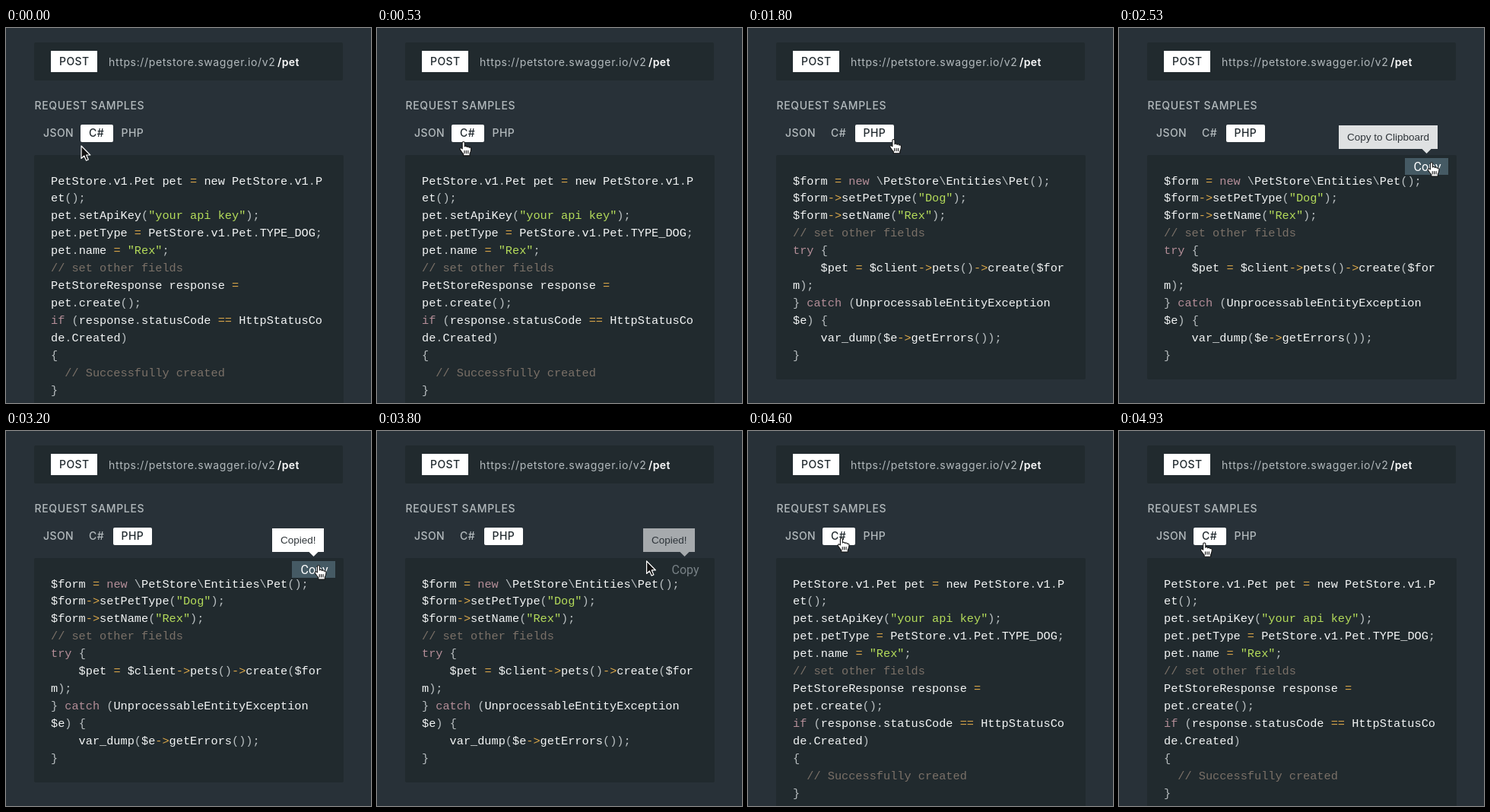
Recreate the animation shown at these times as an HTML page. Size 480 by 493 pixels, loop 4990 ms.

```html
<!DOCTYPE html>
<html lang="en">
<head>
<meta charset="utf-8">
<title>Request samples</title>
<style>
  html, body { margin: 0; width: 100%; height: 100%; overflow: hidden; background: #283138; }
  svg { display: block; width: 100%; height: 100%; }
  text { white-space: pre; }
  .ui { font: 500 14px Inter, sans-serif; letter-spacing: .4px; fill: #b3babd; }
  .wide { letter-spacing: .65px; }
  .code { font: 15.25px "Liberation Mono", monospace; fill: #f4f6f6; }
  .comment { fill: #7b7168; }
  .string { fill: #b5dc5a; }
  .keyword { fill: #b48e98; }
  .operator { fill: #dda94a; }
  .punctuation { fill: #b9bfc1; }
  .tip { font: 13.5px "Liberation Sans", sans-serif; fill: #30363a; }
  #copyText { font: 16px Roboto, sans-serif; }
</style>
</head>
<body>
<svg viewBox="0 0 480 493">
  <rect width="480" height="493" fill="#283138"/>
  <rect x="37" y="19" width="406" height="50" rx="2" fill="#212a2e"/>
  <rect x="59" y="30" width="61" height="28" fill="#fff"/>
  <text class="ui" x="70" y="49" style="fill:#20292e">POST</text>
  <text class="ui wide" x="135" y="50" style="font-weight:400">https://petstore.swagger.io/v2</text>
  <text class="ui" x="357" y="50" style="fill:#fff;font-weight:600">/pet</text>
  <text class="ui wide" x="37.5" y="107">REQUEST SAMPLES</text>
  <rect id="tabBox" y="127" height="23" rx="2" fill="#fff"/>
  <g id="tabs" class="ui">
    <text x="49" y="143">JSON</text>
    <text x="109" y="143">C#</text>
    <text x="151.5" y="143">PHP</text>
  </g>
  <rect id="panel" x="37" y="167" width="407" rx="2" fill="#212a2e"/>
  <g id="sharp" class="code"></g>
  <g id="php" class="code"></g>
  <g id="copy">
    <rect id="copyBox" x="376" y="171" width="57" height="22" fill="#455a64"/>
    <text id="copyText" x="387.5" y="188">Copy</text>
  </g>
  <g id="tip">
    <rect id="tipBox" y="128" height="31" fill="#fff"/>
    <path d="M398 158.5h13l-6.5 6.5z" fill="#fff"/>
    <text id="tipText" class="tip" y="148"></text>
  </g>
  <path id="arrow" d="M0 0V16.5L3.8 13L6.5 19.2L9.3 18L6.7 12H11.8Z" fill="#111" stroke="#fff" stroke-width="1.2" stroke-linejoin="round"/>
  <g id="hand" stroke="#111" stroke-width="1.1" stroke-linejoin="round" stroke-linecap="round">
    <path d="M-1.6 9V1.2C-1.6 -.8 1.5 -.8 1.5 1.2V6C2 4.9 4.3 5 4.5 6.6C5.2 5.6 7.2 5.9 7.4 7.4C8.3 6.6 10 7.2 10 8.8C10 12 9.4 13.6 8.3 15.3V18H-.2V15.8C-1.7 14.2 -3 12.3 -4.5 10C-5.6 8.3 -3.7 7.3 -2.5 8.2Z" fill="#fff"/>
    <path d="M1.2 11.5V15M3.6 11.5V15M6 11.5V15" fill="none"/>
  </g>
</svg>
<script>
const LOOP = 4990;
const $ = id => document.getElementById(id);
const show = (id, on) => $(id).setAttribute("visibility", on ? "visible" : "hidden");
const set = (id, attrs) => {
  for (const key in attrs) $(id).setAttribute(key, attrs[key]);
};

const samples = {
  sharp: String.raw`PetStore.v1.Pet pet = new PetStore.v1.P
et();
pet.setApiKey("your api key");
pet.petType = PetStore.v1.Pet.TYPE_DOG;
pet.name = "Rex";
// set other fields
PetStoreResponse response =
pet.create();
if (response.statusCode == HttpStatusCo
de.Created)
{
  // Successfully created
}`,
  php: String.raw`$form = new \PetStore\Entities\Pet();
$form->setPetType("Dog");
$form->setName("Rex");
// set other fields
try {
    $pet = $client->pets()->create($for
m);
} catch (UnprocessableEntityException
$e) {
    var_dump($e->getErrors());
}`
};

const keywords = { sharp: "if", php: "new|try|catch" };

function highlight(id) {
  const token = new RegExp(
    String.raw`(?<comment>//.*)|(?<string>"[^"]*")|(?<keyword>\b(?:${keywords[id]})\b)` +
    String.raw`|(?<operator>->|=+)|(?<punctuation>[(){};.\\]+)|[^/"=(){};.\\\s-]+|\s+`, "g");
  samples[id].split("\n").forEach((line, row) => {
    const text = document.createElementNS("http://www.w3.org/2000/svg", "text");
    text.setAttribute("x", 59);
    text.setAttribute("y", 205.5 + row * 22.93);
    for (const match of line.matchAll(token)) {
      const span = document.createElementNS("http://www.w3.org/2000/svg", "tspan");
      const kind = Object.keys(match.groups).find(name => match.groups[name]);
      if (kind) span.setAttribute("class", kind);
      span.textContent = match[0];
      text.append(span);
    }
    $(id).append(text);
  });
}

// Pointer hot spot: time, x, y
const path = [
  [0, 99, 155], [200, 96, 156], [400, 99, 155], [620, 122, 147], [870, 165, 140],
  [1350, 165, 140], [1700, 190, 146], [1850, 192, 147], [2400, 411, 177],
  [3660, 411, 177], [4140, 140, 148], [4220, 137, 148], [4480, 123, 141],
  [4880, 123, 141], [LOOP, 99, 155]
];

function pointerAt(t) {
  const i = path.findIndex(p => p[0] > t);
  const [t0, x0, y0] = path[i - 1], [t1, x1, y1] = path[i];
  const u = (t - t0) / (t1 - t0), k = u * u * (3 - 2 * u);
  return [x0 + (x1 - x0) * k, y0 + (y1 - y0) * k];
}

const inside = (x, y, left, top, right, bottom) =>
  x >= left && x <= right && y >= top && y <= bottom;

function draw(t) {
  const [x, y] = pointerAt(t);
  const php = t >= 900 && t < 4530;
  const copied = t >= 2960;
  const onCopy = inside(x, y, 376, 171, 433, 193);
  const onTab = inside(x, y, 98, 127, 193, 150);

  show("php", php);
  show("sharp", !php);
  set("panel", { height: php ? 295 : 330 });
  set("tabBox", php ? { x: 141, width: 51 } : { x: 98, width: 43 });
  [...$("tabs").children].forEach((tab, i) => {
    tab.style.fill = i === (php ? 2 : 1) ? "#20292e" : "";
  });

  show("copy", t >= 1960 && t < 4330);
  set("copyBox", { opacity: onCopy ? 1 : 0 });
  set("copyText", { fill: onCopy ? "#fff" : "#788186" });

  const fade = Math.min(1, Math.max(0, (t - 2360) / 200), Math.max(0, (3860 - t) / 100));
  set("tip", { opacity: fade });
  set("tipBox", copied ? { x: 350, width: 68 } : { x: 289, width: 130 });
  set("tipText", { x: copied ? 361 : 300 });
  $("tipText").textContent = copied ? "Copied!" : "Copy to Clipboard";

  const hand = onCopy || onTab;
  show("hand", hand);
  show("arrow", !hand);
  set(hand ? "hand" : "arrow", { transform: `translate(${x} ${y})` });
}

Object.keys(samples).forEach(highlight);
const start = performance.now();
function tick() {
  draw((performance.now() - start) % LOOP);
  requestAnimationFrame(tick);
}
tick();
</script>
</body>
</html>
```
